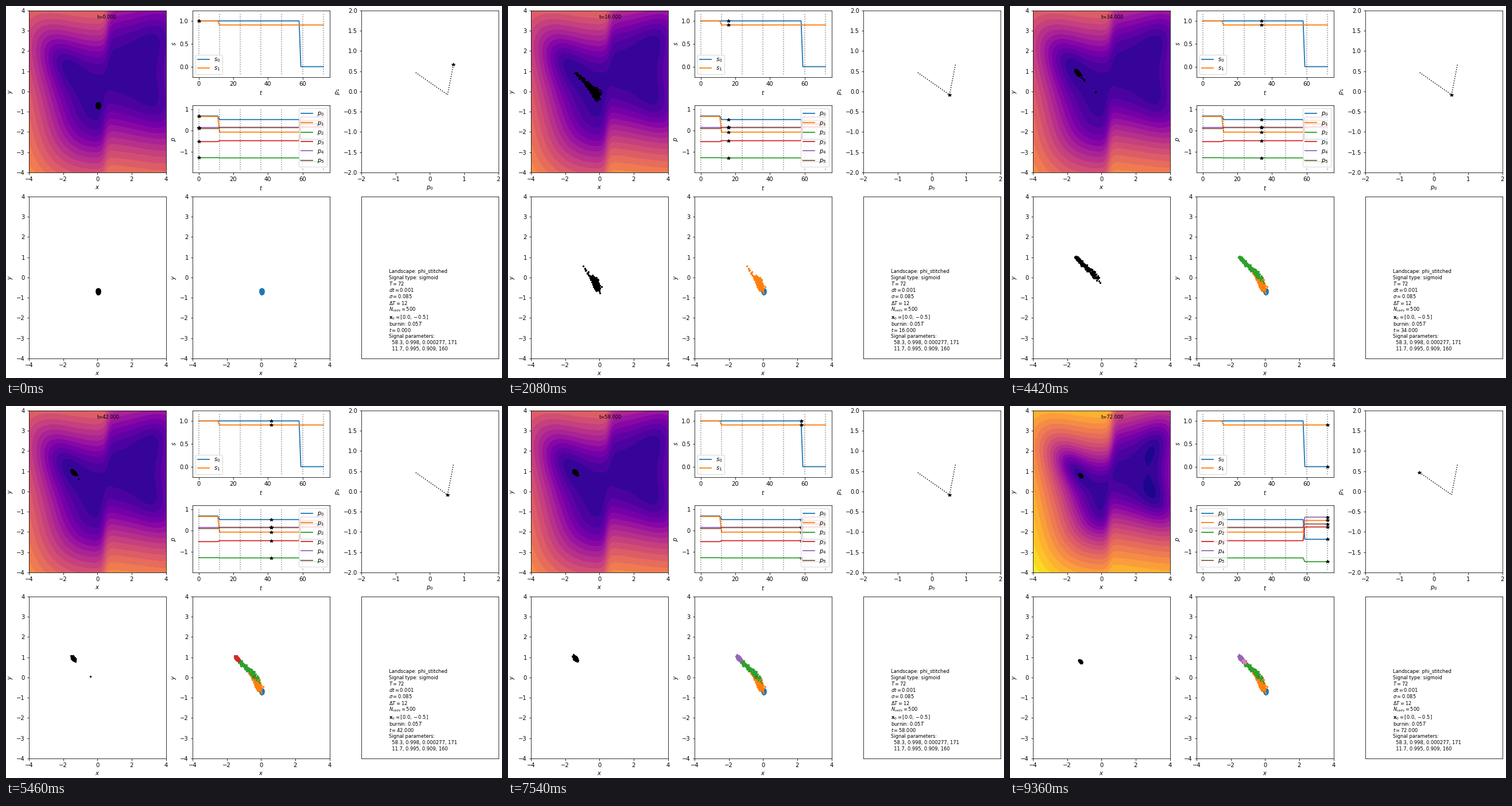
A matplotlib script that plays this animation: 864 px wide and 648 px high, repeating every 9490 ms.

```python
import matplotlib.pyplot as plt
import numpy as np
from matplotlib.animation import FuncAnimation

W, H, DPI = 864, 648, 72
T, N_CELLS, SIGMA, SAMPLE = 72, 500, 0.085, 12

# Landscape parameters p0..p5 in each of the three signal regimes
PARAMS = np.array([
    [0.685, 0.66, -1.29, -0.53, 0.14, 0.09],
    [0.515, -0.08, -1.30, -0.485, 0.143, 0.138],
    [-0.42, 0.47, -1.48, 0.165, 0.63, 0.305],
])
SIGNALS = np.array([[0.998, 0.995], [0.998, 0.909], [0.0003, 0.909]])


def regime(t):
    """Signals switch at t=11.7 and t=58.3."""
    return int(t > 11.7) + int(t > 58.3)


def phi(x, y, p):
    """Binary choice on the left stitched to binary flip on the right."""
    choice = x**4 + y**4 + y**3 - 4 * x**2 * y + y**2 + p[0] * x + p[1] * y
    u, v = x - 2, y - 1
    flip = u**4 + v**4 + u**3 - 2 * u * v**2 - u**2 + p[2] * u + p[3] * v
    w = (1 + np.tanh(5 * (x - 0.5))) / 2
    return (1 - w) * p[4] * choice + w * p[5] * flip


def simulate(steps=50, seed=3):
    """Euler-Maruyama paths of all cells, stored at integer times."""
    rng = np.random.default_rng(seed)
    radius = np.sqrt(rng.random(N_CELLS))
    angle = rng.uniform(0, 2 * np.pi, N_CELLS)
    x = 0.04 + 0.1 * radius * np.cos(angle)
    y = -0.69 + 0.13 * radius * np.sin(angle)
    path = [np.array([x, y])]
    dt = 1 / steps
    for i in range(T * steps):
        p = PARAMS[regime(i * dt)]
        dx = 4 * x**3 - 8 * x * y + p[0]
        dy = 4 * y**3 + 3 * y**2 - 4 * x**2 + 2 * y + p[1]
        kick = SIGMA * np.sqrt(dt) * rng.standard_normal((2, N_CELLS))
        x = x - p[4] * dx * dt + kick[0]
        y = y - p[4] * dy * dt + kick[1]
        if (i + 1) % steps == 0:
            path.append(np.array([x, y]))
    return path


fig = plt.figure(figsize=(W / DPI, H / DPI), dpi=DPI)


def panel(left, top, bottom, xlabel="", ylabel="", xlim=None, ylim=None):
    """Axes placed in pixels, measured from the top left."""
    ax = fig.add_axes([left / W, 1 - bottom / H, 238.7 / W, (bottom - top) / H])
    ax.set(xlim=xlim, ylim=ylim)
    ax.set_xlabel(xlabel)
    ax.set_ylabel(ylabel)
    return ax


COLS = (39.9, 324.9, 619.1)
UPPER, LOWER = (7.8, 290), (331.8, 614)
BOX = dict(xlabel="$x$", ylabel="$y$", xlim=(-4, 4), ylim=(-4, 4))
TIME = dict(xlabel="$t$", xlim=(-3.6, 75.6))

ax_land = panel(COLS[0], *UPPER, **BOX)
ax_s = panel(COLS[1], UPPER[0], 124.1, ylabel="$s$", ylim=(-0.231, 1.225), **TIME)
ax_p = panel(COLS[1], 173.3, UPPER[1], ylabel="$p$", ylim=(-1.99, 1.18), **TIME)
ax_phase = panel(COLS[2], *UPPER, "$p_0$", "$p_1$", (-2, 2), (-2, 2))
ax_snap = panel(COLS[0], *LOWER, **BOX)
ax_all = panel(COLS[1], *LOWER, **BOX)
ax_info = panel(COLS[2], *LOWER)
ax_info.set(xticks=[], yticks=[])
for ax in (ax_land, ax_snap, ax_all):
    ax.set_xticks(range(-4, 5, 2))
    ax.set_yticks(range(-4, 5))
ax_phase.set_xticks(range(-2, 3))
ax_phase.set_yticks(np.arange(-2, 2.1, 0.5))

times = np.arange(T + 1)
regimes = np.array([regime(t) for t in times])
signals, params = SIGNALS[regimes], PARAMS[regimes]
cells = simulate()

# Landscape, one set of contours per regime
gx, gy = np.meshgrid(np.linspace(-4, 4, 201), np.linspace(-4, 4, 201))
levels = np.linspace(0.348, 6.228, 21)
contours = [
    ax_land.contourf(gx, gy, np.log(phi(gx, gy, p) + 2.2), levels, cmap="plasma")
    for p in PARAMS
]
DOT = dict(marker=".", ls="none", ms=4.6)
dots, = ax_land.plot([], [], color="k", **DOT)
clock = ax_land.text(0.5, 0.95, "", fontsize="small", transform=ax_land.transAxes)


def draw_series(ax, series, name):
    """Plot all curves over time and return the star markers."""
    for i, values in enumerate(series.T):
        ax.plot(times, values, lw=1.8, label=f"${name}_{i}$")
    lo, hi = ax.get_ylim()
    pad = (hi - lo) / 22
    ax.vlines(times[::SAMPLE], lo + pad, hi - pad, colors="k", linestyles=":", alpha=0.5)
    return ax.plot([], [], "k*", ls="none")[0]


star_s = draw_series(ax_s, signals, "s")
star_p = draw_series(ax_p, params, "p")
ax_s.legend(loc="lower left", labelspacing=0.3)
legend_left = ax_p.legend(loc="upper left", labelspacing=0.44)
ax_p.add_artist(legend_left)
legend_right = ax_p.legend(loc="upper right", labelspacing=0.44)

ax_phase.plot(PARAMS[:, 0], PARAMS[:, 1], "k:")
star_phase, = ax_phase.plot([], [], "k*", ls="none")

snap, = ax_snap.plot([], [], color="k", **DOT)
layers = [
    ax_all.plot(*cells[k], color=f"C{i}", **DOT)[0]
    for i, k in enumerate(range(0, T + 1, SAMPLE))
]

INFO = [
    "Landscape: phi_stitched",
    "Signal type: sigmoid",
    "$T=72$",
    "$dt=0.001$",
    r"$\sigma=0.085$",
    r"$\Delta T=12$",
    "$N_{cells}=500$",
    r"$\mathbf{x}_0=[0.0, -0.5]$",
    "burnin: $0.05T$",
    "$t=0.000$",
    "Signal parameters:",
    "  58.3, 0.998, 0.000277, 171",
    "  11.7, 0.995, 0.909, 160",
]


def line_step(line):
    """Distance in pixels from the baseline above."""
    if "[" in line:
        return 13.5
    return 11.25 if "$" in line else 10.7


def draw_info():
    """Stack the lines upwards from the last one; return the time line."""
    y, now = 0.05 * 282.2, None
    for line in reversed(INFO):
        text = ax_info.text(0.2, y / 282.2, line, fontsize="small",
                            transform=ax_info.transAxes)
        if line.startswith("$t="):
            now = text
        y += line_step(line)
    return now


now = draw_info()


def update(t):
    r = regimes[t]
    for i, c in enumerate(contours):
        c.set_visible(i == r)
    dots.set_data(*cells[t])
    clock.set_text(f"t={t:.3f}")
    now.set_text(f"$t={t:.3f}$")
    star_s.set_data([t] * 2, signals[t])
    star_p.set_data([t] * 6, params[t])
    star_phase.set_data([params[t, 0]], [params[t, 1]])
    legend_left.set_visible(r == 2)
    legend_right.set_visible(r < 2)
    last = t // SAMPLE
    snap.set_data(*cells[last * SAMPLE])
    for i, layer in enumerate(layers):
        layer.set_visible(i <= last)
    return []


anim = FuncAnimation(fig, update, frames=T + 1, interval=130, repeat=True,
                     repeat_delay=0, blit=False)
plt.show()
```
